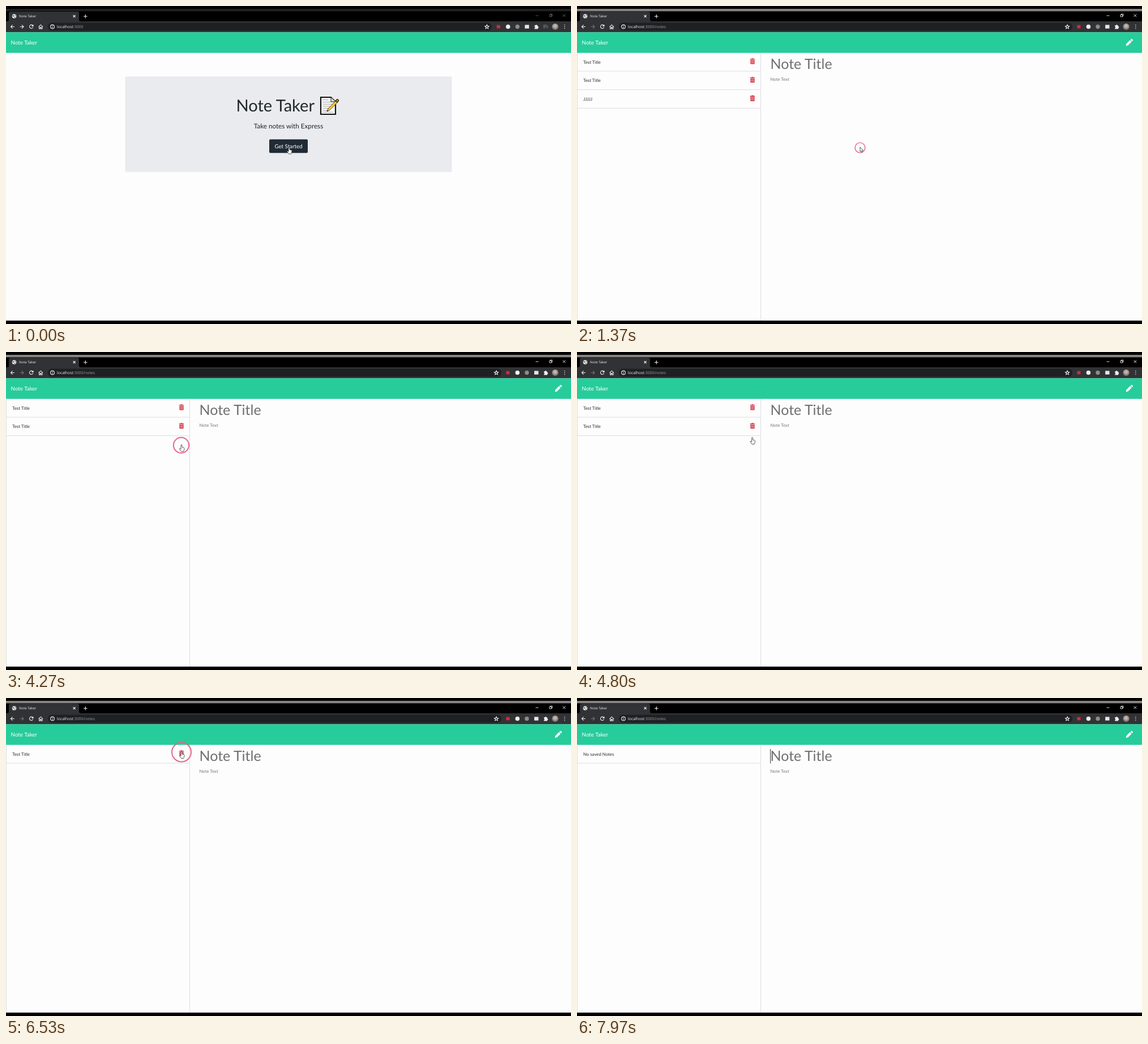
An HTML page that plays this animation: 998x561 px, repeating every 8000 ms.

```html
<!DOCTYPE html>
<html lang="en">
<head>
<meta charset="utf-8">
<title>Note Taker</title>
<style>
  html, body { margin: 0; width: 100%; height: 100%; overflow: hidden; background: #000; }
  svg { display: block; width: 998px; height: 561px; }
  text { font-family: Lato, sans-serif; text-rendering: geometricPrecision; }
  .ui { font-family: "Open Sans", sans-serif; }
  .line { fill: none; stroke: #eee; stroke-width: 1.1; }
  .rule { stroke: #dedee2; stroke-width: 1; }
</style>
</head>
<body>
<svg viewBox="0 0 998 561">
  <defs>
    <radialGradient id="portrait" cy=".4">
      <stop offset="0" stop-color="#d9bfae"/>
      <stop offset=".5" stop-color="#b5a8a0"/>
      <stop offset="1" stop-color="#77736f"/>
    </radialGradient>
    <g id="trash" fill="#d23c48">
      <path d="M-4.3-4.2h2.4l.6-1h2.6l.6 1h2.4v1.3h-8.6z"/>
      <path d="M-3.7-2.2h7.4v6.3q0 1-1 1h-5.4q-1 0-1-1z"/>
      <path d="M-1.8-1v4.8M0-1v4.8M1.8-1v4.8" stroke="#f7d5d7" stroke-width=".7"/>
    </g>
  </defs>

  <!-- browser frame -->
  <rect id="strip" y="5" width="998" height="4.3"/>
  <path d="M2 27q3 0 3-3v-11q0-3 3-3h118q3 0 3 3v11q0 3 3 3z" fill="#313235"/>
  <rect y="27" width="998" height="19.5" fill="#313235"/>
  <circle cx="14.5" cy="18" r="3.8" fill="#eee"/>
  <path d="M12 16l2.4 1-.8 1.7-2-.4zM15.2 15.2l2 1.4-1 1.5zM14.8 19l2 .4-1.8 1.8z" fill="#444"/>
  <text class="ui" x="23" y="20.2" font-size="6" fill="#f0f0f0">Note Taker</text>
  <path class="line" d="M118.6 16l4 4m0-4l-4 4M137 18.2h6.6M140.3 14.9v6.6"/>
  <g id="windowButtons" class="line">
    <path d="M935.5 17h5M983.6 14.5l4.6 4.6m0-4.6l-4.6 4.6M960 15.5h3.5v3.5h-3.5zM961.3 15.5v-1.3h3.6v3.6h-1.4" stroke-width=".9"/>
  </g>
  <path class="line" d="M15 36.5h-6.6m3.2-3.2l-3.2 3.2 3.2 3.2"/>
  <path id="forward" class="line" d="M24.5 36.5h6.6m-3.2-3.2l3.2 3.2-3.2 3.2"/>
  <path class="line" d="M47.4 34.6a3.2 3.2 0 1 0 .3 2.8M48 33v2.4h-2.6"/>
  <path class="line" d="M57.5 36.8l3.8-3.6 3.8 3.6M58.7 36v4.2h1.8v-2.6h1.6v2.6h1.8v-4.2"/>
  <rect id="address" x="74" y="29.5" height="14" rx="7" fill="#1f2023"/>
  <circle class="line" cx="82" cy="36.5" r="3.4" stroke-width=".8"/>
  <path class="line" d="M82 36v2.4M82 34.3v.8" stroke-width=".8"/>
  <text class="ui" x="90" y="38.9" font-size="6.9" fill="#f2f2f2">localhost<tspan id="path" fill="#9b9da0"></tspan></text>
  <g id="tools">
    <path class="line" d="M849.5 33l1 2.4 2.5.2-1.9 1.7.6 2.5-2.2-1.4-2.2 1.4.6-2.5-1.9-1.7 2.5-.2z" stroke-width=".7"/>
    <rect x="866.8" y="33.7" width="6" height="5.6" fill="#d8283c"/>
    <circle cx="886.8" cy="36.5" r="3.8" fill="#f0f0f0"/>
    <circle cx="903.4" cy="36.5" r="3.7" fill="#8b8f7c"/>
    <rect x="916.5" y="33.3" width="7.4" height="6.4" fill="#e6e6e6"/>
    <path d="M933.5 34.3h1.7a1.3 1.3 0 0 1 2.6 0h1.7v2a1.3 1.3 0 0 1 0 2.6v1.7h-6v-1.8a1.2 1.2 0 0 0 0-2.4z" fill="#eee"/>
  </g>
  <path id="queue" d="M949 34h7m-7 2.3h5m-5 2.3h3M955.8 39.5v-3.2l2 0" stroke="#85868a" fill="none"/>
  <circle cx="970" cy="36.5" r="5.7" fill="url(#portrait)"/>
  <path d="M986.8 33.4v.1m0 2.9v.1m0 2.9v.1" stroke="#eee" stroke-width="1.5" stroke-linecap="round"/>

  <!-- page -->
  <rect y="46.3" width="998" height="508.7" fill="#fdfdfd"/>
  <rect y="46.3" width="998" height="36.4" fill="#27cc9b"/>
  <text x="8.6" y="68" font-size="9.75" fill="#fff">Note Taker</text>

  <g id="home">
    <rect x="210.5" y="124.3" width="577" height="168.4" rx="1.5" fill="#e9ebee"/>
    <text x="406.5" y="186" font-size="29.1" fill="#20262c">Note Taker</text>
    <path d="M556 161h18l8 8v22h-26z" fill="#fafafa" stroke="#111" stroke-width="2.2"/>
    <path d="M574 161v8h8" fill="#ddd" stroke="#111"/>
    <path d="M559.5 165.5h10m-10 4h14m-14 3.7h18m-18 3.7h16m-16 3.7h14m-14 3.7h10m-10 3h18" stroke="#999" stroke-width=".9"/>
    <path d="M567 186l2-5 14-14.500 3.200 3-14.200 14z" fill="#f5c631" stroke="#222" stroke-width=".7"/>
    <path d="M582 167.500l2.500-2.700q2.500-.8 3 2.200l-2.500 2.900z" fill="#d9a02a" stroke="#111" stroke-width="1.2"/>
    <path d="M567 186l.9-2.400 1.500 1.500z" fill="#111"/>
    <text x="499" y="215.800" font-size="11.7" fill="#20262c" text-anchor="middle">Take notes with Express</text>
    <rect x="465" y="235.300" width="68" height="23.900" rx="2" fill="#202b36"/>
    <text x="499" y="250.700" font-size="9.75" fill="#fff" text-anchor="middle">Get Started</text>
  </g>

  <g id="notes">
    <path d="M.5 82.700V555M324.500 82.700V555" class="rule"/>
    <g id="list"></g>
    <text x="341.500" y="111.300" font-size="25" fill="#6f6f6f">Note Title</text>
    <text x="341.500" y="131.800" font-size="7.8" fill="#777">Note Text</text>
    <path d="M969.500 70.300l.8-3.600 6.600-6.600 2.900 2.900-6.600 6.600zM977.700 59.300l1-1q.8-.7 1.600 0l1.300 1.300q.7.800 0 1.600l-1 1z" fill="#fff"/>
    <path id="caret" d="M341.700 90v25.500" stroke="#333"/>
  </g>
  <circle id="ring" fill="none" stroke="#e5668b"/>
  <g id="cursor" fill="#fff" stroke="#333" stroke-width=".8" stroke-linejoin="round">
    <path id="hand" d="M-1 1q0-1 1-1t1 1v3.500l3 .7q1.200.4 1 1.600l-.6 3.200-.7 2h-4.200l-3-4.200q-.3-1.400 1-1l1.500 1.200z"/>
    <path id="arrow" d="M0 0v8.200l1.900-1.700 1.300 3 1.300-.6-1.300-2.900h2.400z"/>
    <path id="beam" d="M-1.800-5q1.800 0 1.800 1v8q0 1-1.800 1M1.800-5q-1.800 0-1.800 1v8q0 1 1.800 1" fill="none"/>
  </g>
</svg>
<script>
const LOOP = 8000, NAVIGATE = 1250, FOCUS = 7480;
const ROW = 32.7, RING_TIME = 550, DELETE_DELAY = 80;
const $ = id => document.getElementById(id);
const show = (id, on) => $(id).style.display = on ? "" : "none";

// [time, x, y] of the pointer's hot spot
const moves = [
  [0, 500, 249], [1650, 500, 249], [2350, 211, 217.5], [2650, 211, 217.5],
  [3550, 310, 163.5], [4650, 310, 163.5], [5000, 309, 131], [5850, 309, 131],
  [6250, 310, 94.5], [6750, 310, 94.5], [7250, 345, 103], [LOOP, 345, 103]
];

// [time, x, y] of each click ring
const clicks = [
  [1100, 500, 250], [4150, 309.5, 164.5], [5205, 309, 132], [6515, 310, 95.5], [7400, 345, 103]
];
const deletions = clicks.slice(1, 4).map(c => c[0] + DELETE_DELAY);

function pointerAt(t) {
  const i = moves.findIndex(m => m[0] > t);
  const [t0, x0, y0] = moves[i - 1], [t1, x1, y1] = moves[i];
  const p = (t - t0) / (t1 - t0), eased = p * p * (3 - 2 * p);
  return [x0 + (x1 - x0) * eased, y0 + (y1 - y0) * eased];
}

function drawList(titles, removable) {
  $("list").innerHTML = titles.map((title, i) => `
    <g transform="translate(0 ${82.7 + i * ROW})">
      <text x="11" y="18.900" font-size="7.8" fill="#2b2b2b">${title}</text>
      ${removable ? '<use href="#trash" x="310" y="14.700"/>' : ""}
      <path class="rule" d="M0 32.300H324.500"/>
    </g>`).join("");
}

let shownCount = -1;
function updateList(t) {
  const count = deletions.filter(d => t < d).length;
  if (count === shownCount) return;
  shownCount = count;
  const titles = ["Test Title", "Test Title", "JJJJJ"].slice(0, count);
  drawList(count ? titles : ["No saved Notes"], count > 0);
}

function drawRing(t) {
  const click = clicks.find(([start]) => t >= start && t < start + RING_TIME);
  show("ring", click);
  if (!click) return;
  const r = 17.5 * (1 - (t - click[0]) / RING_TIME);
  $("ring").setAttribute("cx", click[1]);
  $("ring").setAttribute("cy", click[2]);
  $("ring").setAttribute("r", r);
  $("ring").setAttribute("stroke-width", Math.min(2, r / 6));
}

function drawPointer(t) {
  const shape = t < NAVIGATE ? "hand" : t < 3450 ? "arrow" : t < 6800 ? "hand" : t < 7100 ? "arrow" : "beam";
  for (const id of ["hand", "arrow", "beam"]) show(id, id === shape);
  show("cursor", t < 400 || (t > 1000 && t < FOCUS + 100));
  $("cursor").setAttribute("transform", `translate(${pointerAt(t)})`);
}

function draw(t) {
  const onNotes = t >= NAVIGATE;
  show("home", !onNotes);
  show("notes", onNotes);
  show("queue", !onNotes);
  show("caret", t >= FOCUS);
  $("strip").setAttribute("fill", onNotes ? "#89847f" : "#202020");
  $("windowButtons").style.opacity = onNotes ? 1 : 0.4;
  $("forward").style.opacity = onNotes ? 0.35 : 1;
  $("address").setAttribute("width", onNotes ? 801 : 784);
  $("tools").setAttribute("transform", `translate(${onNotes ? 16.6 : 0} 0)`);
  $("path").textContent = onNotes ? ":3000/notes" : ":3000";
  updateList(t);
  drawRing(t);
  drawPointer(t);
}

function tick() {
  draw(performance.now() % LOOP);
  requestAnimationFrame(tick);
}
tick();
</script>
</body>
</html>
```
